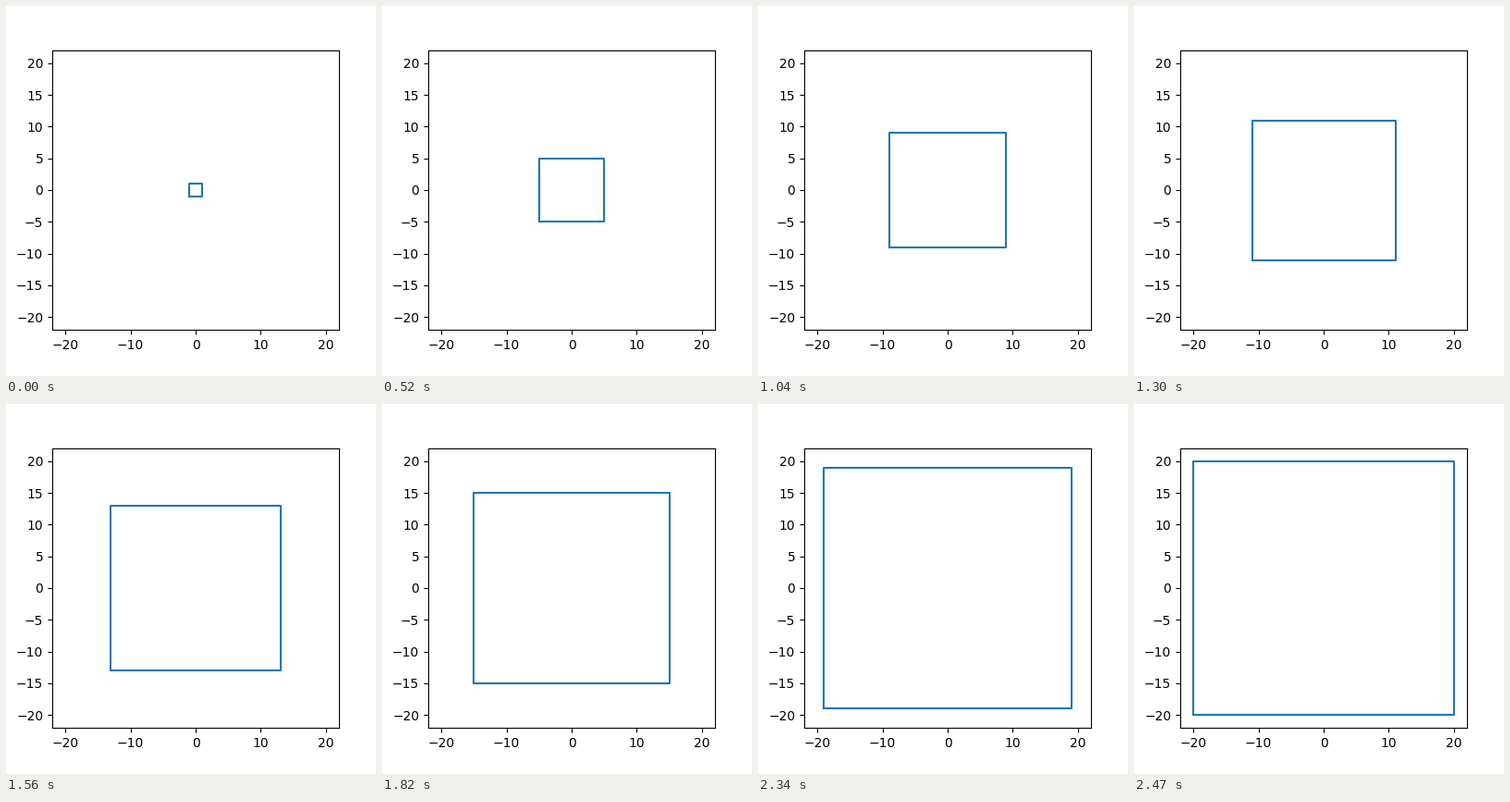
These frames come from a looping animation (400x400 px, 2.6 s). A matplotlib script:

```python
import numpy as np
import matplotlib.pyplot as plt
from matplotlib.animation import FuncAnimation

FRAMES = 20
INTERVAL = 130  # ms

# Corners of a closed unit square
X = np.array([-1, 1, 1, -1, -1])
Y = np.array([-1, -1, 1, 1, -1])

fig, ax = plt.subplots(figsize=(4, 4), dpi=100)
fig.subplots_adjust(left=0.125, right=0.9, bottom=0.125, top=0.88)
ax.set(xlim=(-22, 22), ylim=(-22, 22),
       xticks=range(-20, 21, 10), yticks=range(-20, 21, 5))
square, = ax.plot(X, Y, color="C0", lw=1.5)


def update(i):
    half = i + 1
    square.set_data(half * X, half * Y)
    return square,


anim = FuncAnimation(fig, update, frames=FRAMES, interval=INTERVAL,
                     repeat=True, repeat_delay=0)
plt.show()
```
